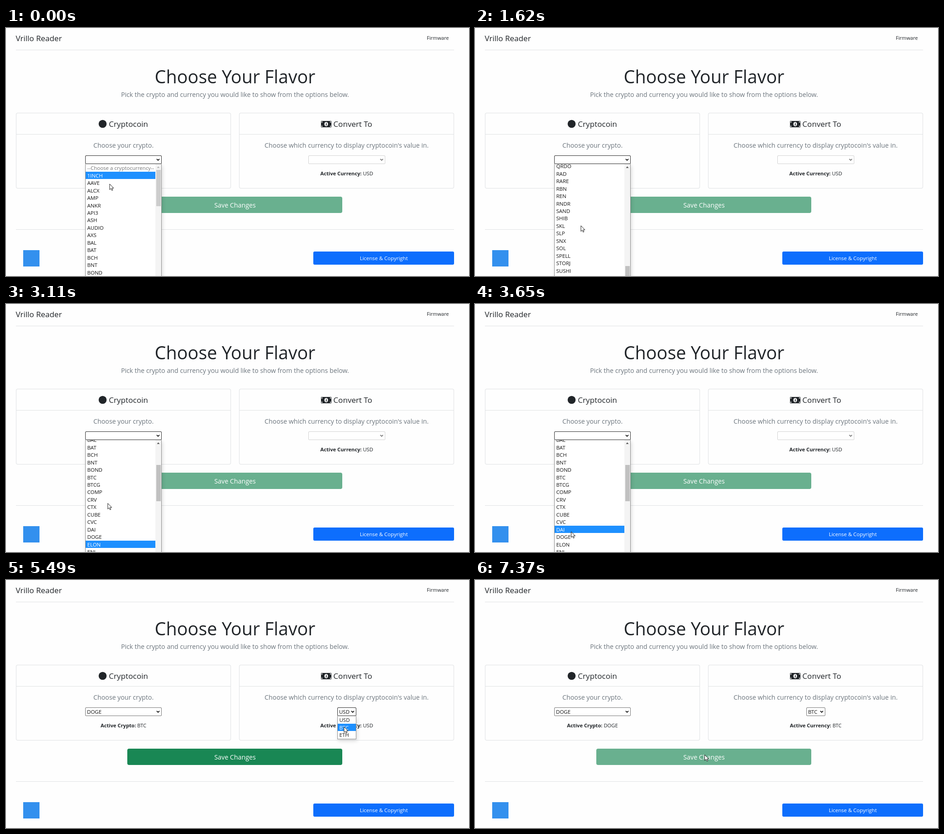
An HTML page with a canvas for the animation above (8 s loop, 1023x547 px).

```html
<!DOCTYPE html>
<html lang="en">
<head>
<meta charset="utf-8">
<title>Vrillo Reader</title>
<style>
  html, body { margin: 0; width: 100%; height: 100%; overflow: hidden; background: #fefefe; }
  canvas { display: block; width: 100%; height: 100%; }
</style>
</head>
<body>
<canvas id="stage" width="1023" height="547"></canvas>
<script>
const ctx = document.getElementById('stage').getContext('2d');
const LOOP = 8000, SAMPLE = 135, LEAD = 15;
const INK = '#212529', MUTED = '#6c757d', LINE = '#dfe1e3', PAGE = '#fefefe';
const ROW = 16.45, LIST_TOP = 300.8, THUMB_RATIO = 4.13;

// Moments at which the page itself changes.
const PICKED = 3920, BLUR = 4670, OPENED = 4910, CLOSED = 6040, CLICKED = 6700, RELEASED = 7100, SAVED = 7250;

const COINS = ('--Choose a cryptocurrency--|1INCH|AAVE|ALCX|AMP|ANKR|API3|ASH|AUDIO|AXS|BAL|BAT|BCH|BNT|' +
  'BOND|BTC|BTCG|COMP|CRV|CTX|CUBE|CVC|DAI|DOGE|ELON|ENJ|ENS|ETH|ETHG|FET|FIL|FTM|GALA|GRT|GUSD|' +
  'KNC|KP3R|LDO|LINK|LRC|LTC|LUNA|MANA|MASK|MC|MCO2|MIM|MIR|MKR|NMR|OXT|PAXG|QNT|QRDO|RAD|RARE|' +
  'RBN|REN|RNDR|SAND|SHIB|SKL|SLP|SNX|SOL|SPELL|STORJ|SUSHI|TOKE|UMA|UNI|USDC|UST|XTZ|YFI|ZRX').split('|');
const CURRENCIES = ['USD', 'BTC', 'ETH'];

// Key points: [time, values...]
const POINTER = [
  [-150, 230, 327], [-15, 229, 344], [240, 234, 436],
  [2970, 234, 436], [3225, 214, 444], [3600, 212.5, 502],
  [3860, 213, 509], [4430, 709.5, 322], [4650, 746, 295],
  [5050, 746, 295], [5450, 747, 326],
  [6060, 747, 326], [6200, 728, 317], [6460, 516, 377],
  [6660, 516, 377], [6800, 507.5, 385.5]
];
const SCROLL = [
  [285, 0], [795, 577], [1070, 778], [1380, 778], [1610, 878], [1930, 878], [2550, 323], [2820, 173.5]
];

const linear = u => u;
const smooth = u => u * u * (3 - 2 * u);

function along(keys, t, ease) {
  const next = keys.findIndex(k => k[0] > t);
  if (next === 0) return keys[0].slice(1);
  if (next < 0) return keys[keys.length - 1].slice(1);
  const a = keys[next - 1], b = keys[next];
  const u = ease((t - a[0]) / (b[0] - a[0]));
  return a.slice(1).map((v, i) => v + (b[i + 1] - v) * u);
}

const pointerAt = t => along(POINTER, t, smooth);
const scrollAt = t => along(SCROLL, t, linear)[0];
const rowAt = (y, scroll) => Math.max(0, Math.floor((y - LIST_TOP + scroll) / ROW));

// The highlight trails the pointer by one sample and stays put while the wheel spins.
function coinHover(now) {
  let t = now - SAMPLE;
  if (t > 525 && t < 3000) t = 525;
  return rowAt(pointerAt(t)[1], scrollAt(t));
}

function text(str, x, y, size, color = INK, align = 'left', weight = 400) {
  ctx.font = `${weight} ${size}px "Open Sans", "Noto Sans", sans-serif`;
  ctx.textAlign = align;
  ctx.fillStyle = color;
  ctx.fillText(str, x, y);
  return ctx.measureText(str).width;
}

function rect(x, y, w, h, color) {
  ctx.fillStyle = color;
  ctx.fillRect(x, y, w, h);
}

function roundBox(x, y, w, h, r, color) {
  ctx.beginPath();
  ctx.roundRect(x, y, w, h, r);
  ctx.fillStyle = color;
  ctx.fill();
}

function bordered(x, y, w, h, r, fill, border, width = 1) {
  roundBox(x, y, w, h, r, border);
  roundBox(x + width, y + width, w - 2 * width, h - 2 * width, Math.max(0, r - width), fill);
}

function disc(x, y, rx, ry, color) {
  ctx.beginPath();
  ctx.ellipse(x, y, rx, ry, 0, 0, Math.PI * 2);
  ctx.fillStyle = color;
  ctx.fill();
}

function trace(points, dx, dy) {
  ctx.beginPath();
  points.forEach(([x, y]) => ctx.lineTo(x + dx, y + dy));
}

function labelled(label, value, cx) {
  const size = 11.2, y = 325.3;
  ctx.font = `700 ${size}px "Open Sans", "Noto Sans", sans-serif`;
  const head = ctx.measureText(label).width;
  ctx.font = `400 ${size}px "Open Sans", "Noto Sans", sans-serif`;
  const left = cx - (head + ctx.measureText(' ' + value).width) / 2;
  text(label, left, y, size, INK, 'left', 700);
  text(' ' + value, left + head, y, size);
}

function banknote(x, y) {
  roundBox(x, y, 23, 14, 1, INK);
  for (const cx of [x + 2, x + 21])
    for (const cy of [y + 2.3, y + 11.7]) disc(cx, cy, 1.2, 1.2, PAGE);
  disc(x + 11.5, y + 7, 4, 4.8, PAGE);
  rect(x + 10.9, y + 4.3, 1.5, 5, INK);
  rect(x + 10, y + 8.5, 3.3, 1, INK);
}

function card(x, hint) {
  bordered(x, 187, 475, 167, 4, PAGE, LINE);
  rect(x, 234, 475, 1, LINE);
  text(hint, x + 237.6, 263.7, 14.23, MUTED, 'center');
}

const BORDERS = { normal: '#767676', open: '#2b2b2b', focus: '#101010', disabled: '#d2d2d2' };

function select(x, w, value, mode) {
  bordered(x, 281, w, 19, 2.5, '#fff', BORDERS[mode], mode === 'focus' ? 2 : 1);
  text(value, x + 4, 295, 11.5, '#111');
  trace([[-3, -1.5], [0, 1.5], [3, -1.5]], x + w - 8, 290.3);
  ctx.strokeStyle = mode === 'disabled' ? '#777' : '#111';
  ctx.lineWidth = 1.8;
  ctx.stroke();
}

function popup(x, w, h, draw) {
  ctx.save();
  ctx.shadowColor = 'rgba(0,0,0,.14)';
  ctx.shadowBlur = 8;
  ctx.shadowOffsetX = 2;
  ctx.shadowOffsetY = 4;
  rect(x, 300, w, h, '#8c8c8c');
  ctx.restore();
  ctx.save();
  ctx.beginPath();
  ctx.rect(x + 1, 300, w - 2, h - 1);
  ctx.clip();
  rect(x, 300, w, h, '#fff');
  draw();
  ctx.restore();
}

function options(list, x, w, scroll, hover) {
  list.forEach((name, i) => {
    const top = LIST_TOP + i * ROW - scroll;
    const on = i === hover;
    if (on) rect(x, Math.round(top), w, 16, '#1e90ff');
    text(name, x + 3.5, top + 12.5, 11.5, on ? '#fff' : name.startsWith('--') ? '#757575' : '#151515');
  });
}

function coinList(now) {
  const scroll = scrollAt(now);
  popup(175, 169, 330, () => {
    options(COINS, 176, 154, scroll, coinHover(now));
    rect(330, 300, 13, 330, '#f4f4f4');
    rect(332, 313 + scroll / THUMB_RATIO, 10, 80, scroll ? '#c1c1c1' : '#cdcdcd');
    trace([[-3, 1.7], [0, -1.7], [3, 1.7]], 336.5, 307);
    ctx.fillStyle = scroll ? '#505050' : '#b5b5b5';
    ctx.fill();
  });
}

function currencyList(now) {
  const hover = rowAt(pointerAt(now)[1], 0);
  popup(732, 42, CURRENCIES.length * ROW + 2, () => options(CURRENCIES, 733, 40, 0, hover));
}

function outlined(draw) {
  ctx.beginPath();
  draw();
  ctx.strokeStyle = '#1a1a1a';
  ctx.lineWidth = 2;
  ctx.lineJoin = 'round';
  ctx.stroke();
  ctx.fillStyle = '#fff';
  ctx.fill();
}

function arrow(x, y) {
  trace([[0, 0], [0, 12.6], [2.9, 9.9], [4.9, 14.3], [6.9, 13.4], [5, 9.2], [8.9, 9.2]], x, y);
  ctx.closePath();
  ctx.fillStyle = '#fff';
  ctx.fill();
  ctx.strokeStyle = '#1a1a1a';
  ctx.lineWidth = 1;
  ctx.lineJoin = 'round';
  ctx.stroke();
}

function hand(x, y) {
  outlined(() => {
    ctx.roundRect(x - 1, y + .5, 2, 11, 1);
    ctx.roundRect(x - 4, y + 8, 3, 4, 1.5);
    ctx.roundRect(x - 2, y + 6.5, 7.5, 8.5, [1, 2, 2.5, 2.5]);
  });
}

function beam(x, y) {
  rect(x - .5, y - 5.5, 1, 11, '#111');
  for (const cy of [y - 6, y + 5.5]) rect(x - 3, cy, 6, 1, '#111');
}

function page() {
  rect(0, 0, 1023, 547, PAGE);
  text('Vrillo Reader', 21.5, 29, 17.2);
  text('Firmware', 978.5, 26, 11.1, INK, 'right');
  rect(22, 48, 968, 1, LINE);

  text('Choose Your Flavor', 506, 121.5, 39.5, INK, 'center');
  text('Pick the crypto and currency you would like to show from the options below.',
    506, 152.3, 14.23, MUTED, 'center');

  card(22, 'Choose your crypto.');
  disc(213.5, 211.5, 8.8, 8.8, INK);
  text('Cryptocoin', 227.3, 218, 17.1);

  card(515, "Choose which currency to display cryptocoin's value in.");
  banknote(696, 205);
  text('Convert To', 723.3, 218, 17.1);

  rect(22, 444, 968, 1, LINE);
  rect(38, 490, 36, 36, '#3390ee');
  roundBox(679, 493, 311, 29, 3, '#0d6efd');
  text('License & Copyright', 834.7, 512, 11.5, '#fff', 'center');
}

function render(t) {
  const now = Math.floor((t + LEAD) / SAMPLE) * SAMPLE - LEAD;
  const choosing = t < PICKED;
  const listing = t >= OPENED && t < CLOSED;
  const saved = t >= SAVED;
  const enabled = !choosing && t < CLICKED;

  page();
  labelled('Active Crypto:', saved ? 'DOGE' : 'BTC', 259.5);
  labelled('Active Currency:', saved ? 'BTC' : 'USD', 752.8);
  roundBox(268, 372, 475, 36, 4, enabled ? '#198754' : '#69b08f');
  text('Save Changes', 506, 396, 14.23, '#fff', 'center');

  select(175, 169, choosing ? '' : 'DOGE', choosing ? 'open' : t < BLUR ? 'focus' : 'normal');
  if (choosing) {
    select(668, 170, '', 'disabled');
    coinList(now);
  } else {
    const focused = t >= CLOSED && t < RELEASED;
    select(732, 42, t < CLOSED ? 'USD' : 'BTC', listing ? 'open' : focused ? 'focus' : 'normal');
    if (listing) currencyList(now);
  }

  const [x, y] = pointerAt(now);
  const overButton = enabled && x > 268 && x < 743 && y > 372 && y < 408;
  const overText = !listing && Math.abs(x - 753) < 60 && y > 314 && y < 329;
  (overButton ? hand : overText ? beam : arrow)(x, y);
}

const start = performance.now();
function tick() {
  render((performance.now() - start) % LOOP);
  requestAnimationFrame(tick);
}
tick();
</script>
</body>
</html>
```
